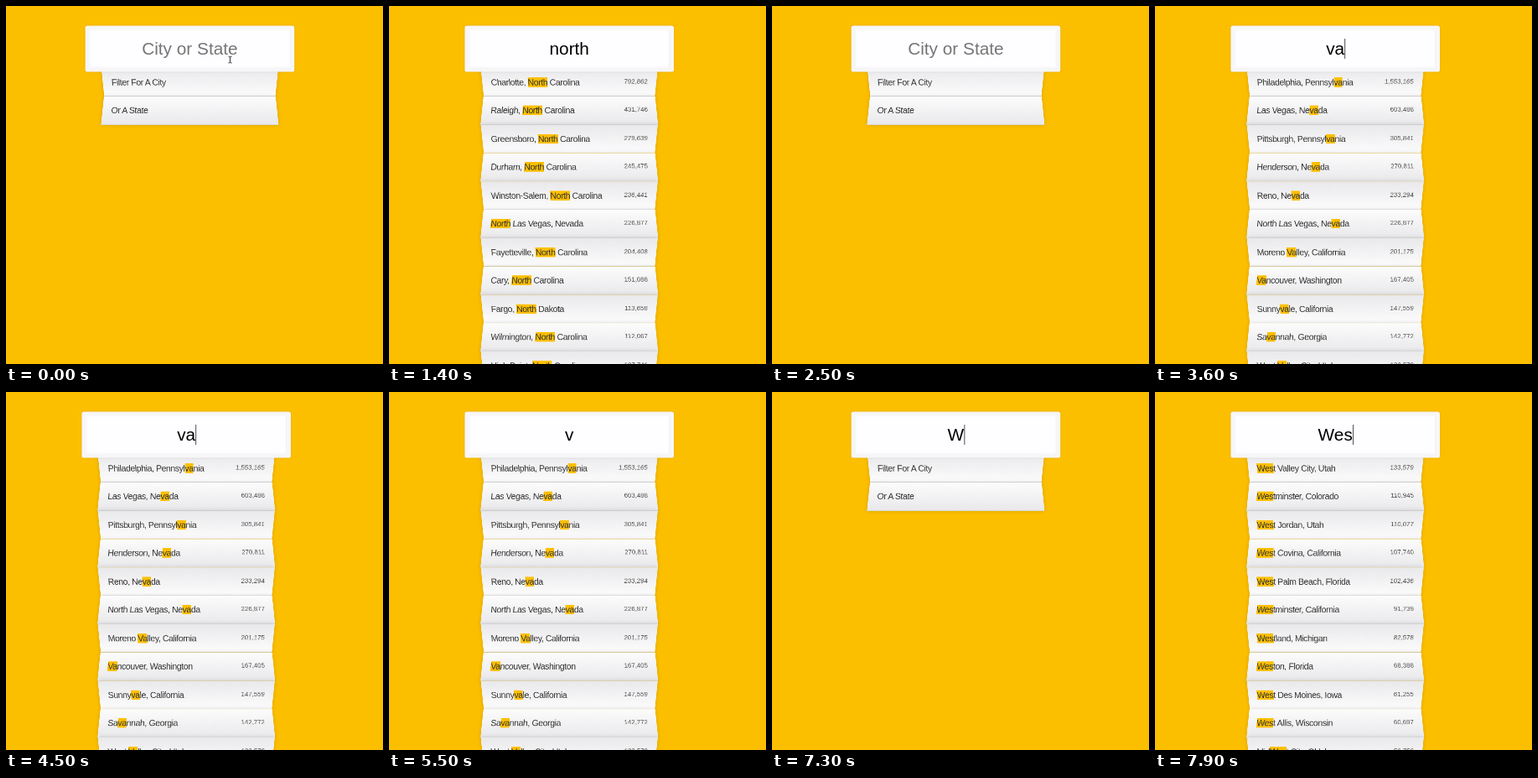
These frames come from a looping animation (450x427 px, 8 s). An HTML page:

```html
<!DOCTYPE html>
<html lang="en">
<head>
<meta charset="utf-8">
<title>Type ahead</title>
<style>
  * { box-sizing: border-box; }
  html, body { margin: 0; width: 100%; height: 100%; overflow: hidden; background: #fcbf00; }
  body { font-family: "Liberation Sans", Arial, sans-serif; }
  #stage { position: relative; width: 100%; height: 100%; overflow: hidden; contain: strict; }
  #form { position: absolute; left: 0; top: 0; width: 400px; transform-origin: 0 0; }
  #search {
    position: absolute; z-index: 2; left: -40px; top: 45px; width: 480px; height: 106px;
    display: flex; align-items: center; justify-content: center;
    background: #fefdff; border: 10px solid #f7f6f7; border-radius: 5px;
    box-shadow: 0 0 5px rgba(0,0,0,.12), inset 0 0 2px rgba(0,0,0,.19);
    font-size: 40px; white-space: pre;
  }
  #hint { position: absolute; left: 0; right: 0; text-align: center; color: #757575; }
  #caret { width: 2px; height: 46px; margin-right: -2px; background: #555; }
  ul { position: absolute; top: 140px; width: 400px; margin: 0; padding: 0; }
  li {
    position: relative; display: flex; justify-content: space-between;
    height: 65px; padding: 20px; list-style: none;
    border-bottom: 1px solid #d8d8d8; box-shadow: 0 0 10px rgba(0,0,0,.14);
    font-size: 20px; line-height: 24px; letter-spacing: -.7px;
    color: #333; text-transform: capitalize; white-space: pre;
  }
  li:nth-child(even) {
    transform: perspective(100px) rotateX(3deg) translateY(2px) scale(1.001);
    background: linear-gradient(to bottom, #fcfcfd, #e9e9eb);
  }
  li:nth-child(odd) {
    transform: perspective(100px) rotateX(-3deg) translateY(3px);
    background: linear-gradient(to top, #fcfcfd, #e9e9eb);
  }
  .count { font-size: 15px; line-height: 20px; letter-spacing: 0; color: #555; }
  .hl { background: #fcbf00; }
  #pointer { position: absolute; left: 264px; top: 59px; }
</style>
</head>
<body>
<div id="stage">
  <div id="form">
    <div id="search"><span id="hint">City or State</span><span id="typed"></span><i id="caret"></i></div>
    <ul id="list"></ul>
  </div>
  <svg id="pointer" width="7" height="10" fill="none" stroke="#333">
    <path d="M1.5 1 Q3.5 1 3.5 2.5 Q3.5 1 5.5 1 M3.5 2V8 M1.5 9 Q3.5 9 3.5 7.5 Q3.5 9 5.5 9"/>
  </svg>
</div>
<script>
const LOOP = 8000, SCALE = .52, ROWS = 11;

const cities = `New York, New York|8405837
Los Angeles, California|3884307
Chicago, Illinois|2718782
Houston, Texas|2195914
Philadelphia, Pennsylvania|1553165
Phoenix, Arizona|1513367
San Antonio, Texas|1409019
San Diego, California|1355896
San Jose, California|998537
Austin, Texas|885400
Indianapolis, Indiana|843393
Jacksonville, Florida|842583
Charlotte, North Carolina|792862
Fort Worth, Texas|792727
Seattle, Washington|652405
Denver, Colorado|649495
Washington, District of Columbia|646449
Nashville-Davidson, Tennessee|634464
Louisville/Jefferson County, Kentucky|609893
Las Vegas, Nevada|603488
Milwaukee, Wisconsin|599164
Albuquerque, New Mexico|556495
Fresno, California|509924
Virginia Beach, Virginia|448479
Raleigh, North Carolina|431746
Cleveland, Ohio|390113
Wichita, Kansas|386552
New Orleans, Louisiana|378715
Pittsburgh, Pennsylvania|305841
Greensboro, North Carolina|279639
Newark, New Jersey|278427
Plano, Texas|274409
Henderson, Nevada|270811
Jersey City, New Jersey|257342
Norfolk, Virginia|246139
Durham, North Carolina|245475
Winston-Salem, North Carolina|236441
Reno, Nevada|233294
North Las Vegas, Nevada|226877
Fayetteville, North Carolina|204408
Moreno Valley, California|201175
Vancouver, Washington|167405
Cary, North Carolina|151088
Sunnyvale, California|147559
Savannah, Georgia|142772
West Valley City, Utah|133579
Norman, Oklahoma|118197
Fargo, North Dakota|113658
Wilmington, North Carolina|112067
Westminster, Colorado|110945
West Jordan, Utah|110077
Lowell, Massachusetts|108861
High Point, North Carolina|107741
West Covina, California|107740
West Palm Beach, Florida|102436
Westminster, California|91739
Westland, Michigan|82578
Weston, Florida|68388
West Des Moines, Iowa|61255
West Allis, Wisconsin|60697
Midwest City, Oklahoma|56756`.split('\n').map(line => line.split('|'));

// [start ms, value]
const typing = [[0, ''], [300, 'n'], [450, 'no'], [600, 'nor'], [700, 'nort'], [800, 'north'],
  [1900, 'nort'], [2000, 'nor'], [2100, 'no'], [2200, 'n'], [2300, ''],
  [3100, 'v'], [3400, 'va'], [5400, 'v'], [5800, ''], [7200, 'W'], [7500, 'We'], [7700, 'Wes']];
// The list follows when a key is released.
const queries = [[0, ''], [400, 'n'], [550, 'no'], [700, 'nor'], [800, 'nort'], [900, 'north'], [2300, ''],
  [3300, 'v'], [3500, 'va'], [5900, ''], [7500, 'W'], [7650, 'We'], [7850, 'Wes']];
const carets = [[0, false], [300, true], [1300, false], [1800, true], [2300, false],
  [3100, true], [3900, false], [4400, true], [4900, false], [6900, true]];

const $ = id => document.getElementById(id);
const valueAt = (track, t) => track.findLast(([start]) => start <= t)[1];
const toggle = (id, on) => $(id).style.visibility = on ? 'visible' : 'hidden';

function rows(query) {
  if (!query) return '<li>Filter for a city</li><li>Or a state</li>';
  const match = new RegExp(query, 'gi');
  return cities.filter(([name]) => name.search(match) >= 0).slice(0, ROWS).map(([name, count]) =>
    `<li><span>${name.replace(match, `<span class="hl">${query}</span>`)}</span>` +
    `<span class="count">${Number(count).toLocaleString('en-US')}</span></li>`).join('');
}

let shown = null;
function draw(now) {
  const t = now % LOOP;
  const text = valueAt(typing, t), query = valueAt(queries, t);
  $('typed').textContent = text;
  toggle('hint', !text);
  toggle('caret', valueAt(carets, t));
  toggle('pointer', t < 300);
  if (query !== shown) {
    shown = query;
    $('list').innerHTML = rows(query);
    // A long list adds a scroll bar, which moves the centre left.
    const centre = query ? 215.2 : 219.4;
    $('form').style.transform = `translateX(${centre - 200 * SCALE}px) scale(${SCALE})`;
  }
  requestAnimationFrame(draw);
}
draw(0);
</script>
</body>
</html>
```
